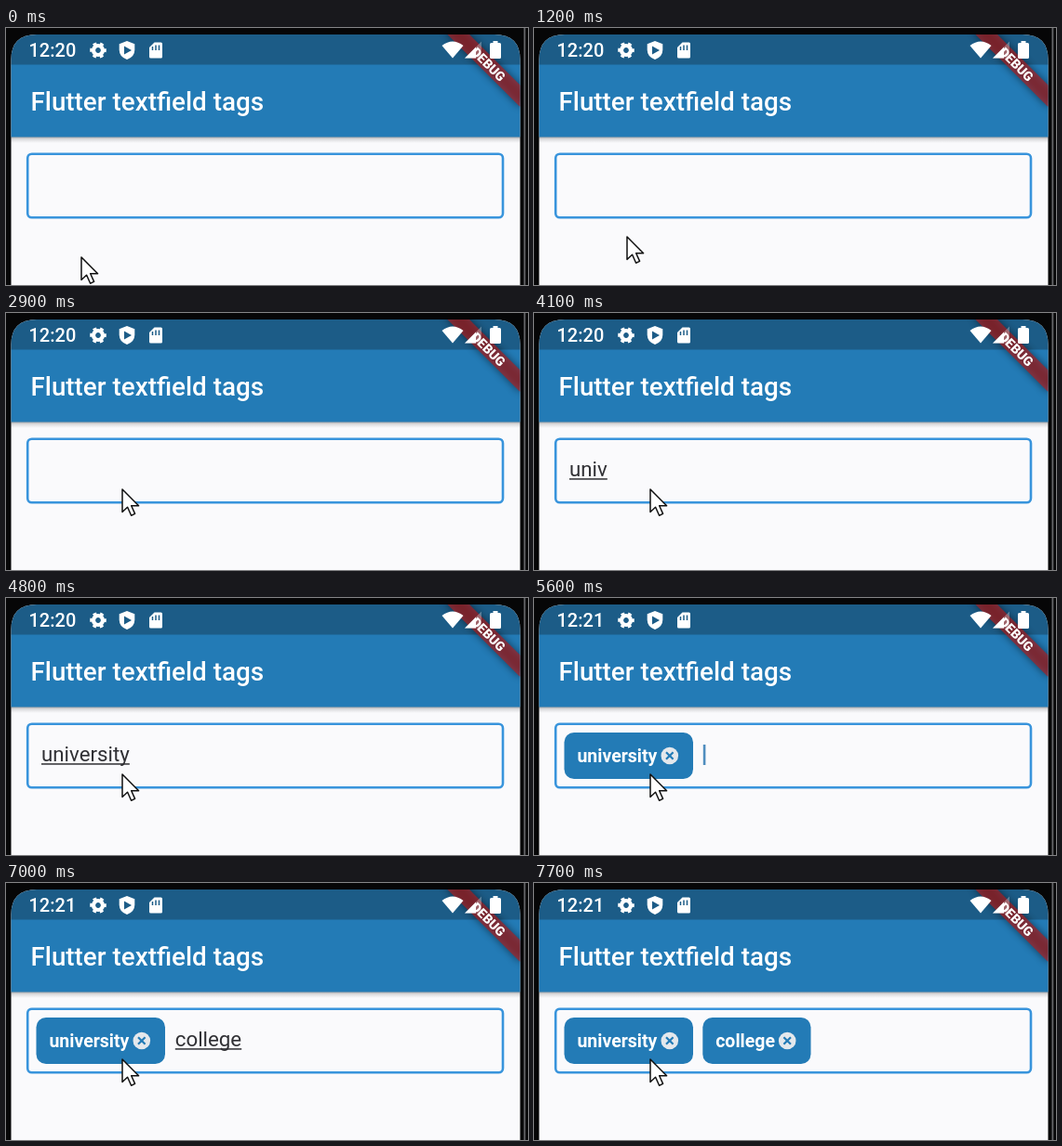
These frames come from a looping animation (561 px wide and 277 px high, 8000 ms). An HTML page:

```html
<!DOCTYPE html>
<html lang="en">
<head>
<meta charset="utf-8">
<title>Flutter textfield tags</title>
<style>
  html, body { margin: 0; width: 100%; height: 100%; overflow: hidden; background: #060607; }
  svg { display: block; width: 561px; height: 277px; font-family: Roboto, "Noto Sans", sans-serif; }
  .chip text { font-size: 19.5px; font-weight: 700; fill: #fff; }
</style>
</head>
<body>
<svg viewBox="0 0 561 277">
  <defs>
    <clipPath id="screen"><path d="M5.500 300V34Q5.500 7 33 7H525Q552.500 7 552.500 34V300Z"/></clipPath>
    <linearGradient id="shade" x2="0" y2="1">
      <stop offset="0" stop-color="#000" stop-opacity=".36"/>
      <stop offset=".4" stop-color="#000" stop-opacity=".12"/>
      <stop offset="1" stop-color="#000" stop-opacity="0"/>
    </linearGradient>
    <filter id="soft" x="-30%" y="-150%" width="160%" height="400%"><feGaussianBlur stdDeviation="4.500"/></filter>
    <g id="cancel">
      <circle r="9.300" fill="#e4e8ec"/>
      <path d="M-3.800-3.800 3.800 3.800M3.800-3.800-3.800 3.800" stroke="#237bb6" stroke-width="2.200"/>
    </g>
  </defs>

  <rect width="561" height="277" fill="#060607"/>
  <rect x="556.500" y="0" width="1.800" height="277" fill="#66676a"/>

  <g clip-path="url(#screen)">
    <rect width="561" height="277" fill="#fafafc"/>
    <rect y="117" width="561" height="7" fill="url(#shade)"/>
    <rect y="39" width="561" height="78.500" fill="#237bb6"/>
    <rect width="561" height="39.500" fill="#1c5c87"/>
    <text x="26.500" y="89.300" font-size="27.800" font-weight="500" fill="#fff">Flutter textfield tags</text>

    <g transform="translate(552 5.800) rotate(45)">
      <rect x="-56" y="39" width="112" height="16.700" fill="#000" opacity=".5" filter="url(#soft)"/>
      <rect x="-56" y="39" width="112" height="16.700" fill="#b71c1c" opacity=".627"/>
      <text y="52.300" font-size="14" font-weight="900" fill="#fff" text-anchor="middle">DEBUG</text>
    </g>
  </g>

  <g fill="#fff">
    <text id="clock" x="24.500" y="31" font-size="20" font-weight="500">12:20</text>
    <g transform="translate(99 24)">
      <circle r="5" fill="none" stroke="#fff" stroke-width="4.200"/>
      <circle r="7.300" fill="none" stroke="#fff" stroke-width="3" stroke-dasharray="3.822" stroke-dashoffset="1.911"/>
    </g>
    <path d="M130 14 138.300 17.200V23.500Q138.300 31 130 34 121.700 31 121.700 23.500V17.200Z"/>
    <path d="M127 19.500 135 24 127 28.500Z" fill="#1c5c87"/>
    <path d="M159.500 15.500H166.500Q168 15.500 168 17V31Q168 32.500 166.500 32.500H155.500Q154 32.500 154 31V21Z"/>
    <path d="M157.500 20v4M161 18.500v5.500M164.500 18.500v5.500" stroke="#1c5c87" stroke-width="1.500"/>
    <path d="M468.500 19Q480 10 491.500 19L480 32.500Z"/>
    <path d="M493 32.500 511 14.500V32.500Z" opacity=".3"/>
    <path d="M493 32.500 505 20.500V32.500Z"/>
    <path d="M523.500 14h5v2h2q1.500 0 1.500 1.500V31.500q0 1.500-1.500 1.500h-9q-1.500 0-1.500-1.500V17.500q0-1.500 1.500-1.500h2Z"/>
  </g>

  <rect x="23.200" y="135.700" width="510.800" height="68.600" rx="4.500" fill="none" stroke="#3894dc" stroke-width="2.600"/>

  <g class="chip" id="chip1">
    <rect x="32.500" y="145" width="138.500" height="50" rx="10.500" fill="#237bb6"/>
    <text x="46.400" y="176.800">university</text>
    <use href="#cancel" x="145.800" y="170"/>
  </g>
  <g class="chip" id="chip2">
    <rect x="181.300" y="145" width="116.200" height="50" rx="10.500" fill="#237bb6"/>
    <text x="195.200" y="176.800">college</text>
    <use href="#cancel" x="272.200" y="170"/>
  </g>

  <text id="typed" y="176.200" font-size="22.300" fill="#303034"></text>
  <rect id="line" y="178.200" height="1.500" fill="#303034"/>
  <rect id="caret" y="158" width="2.600" height="22" fill="#4f8dbe"/>
  <path id="mouse" d="M0 0V24.500L5.600 19.300 9.600 28.200 13.600 26.400 9.700 17.800H17.600Z"
        fill="#fff" stroke="#111" stroke-width="1.500" stroke-linejoin="round"/>
</svg>

<script>
  const LOOP = 8000, STEP = 100;
  const el = id => document.getElementById(id);
  const [clock, chip1, chip2, typed, line, caret, mouse] =
    ['clock', 'chip1', 'chip2', 'typed', 'line', 'caret', 'mouse'].map(el);

  // One entry per phase: left edge, caret start, word and the time of each key.
  const phases = [
    { from: 0, x: 38, blink: 300, word: 'university',
      keys: [3600, 3800, 3900, 4100, 4200, 4400, 4500, 4600, 4700, 4800] },
    { from: 5400, x: 181.8, blink: 5400, word: 'college',
      keys: [5900, 6000, 6200, 6400, 6500, 6900, 7000] },
    { from: 7200, x: 308, blink: 7200, word: '', keys: [] }
  ];

  // Pointer path: time, x, y
  const path = [[900, 81, 247], [1200, 100, 225], [1500, 125, 190]];

  function pointerAt(t) {
    if (t <= path[0][0]) return path[0].slice(1);
    for (let i = 1; i < path.length; i++) {
      const [t0, x0, y0] = path[i - 1], [t1, x1, y1] = path[i];
      if (t <= t1) {
        const k = (t - t0) / (t1 - t0);
        return [x0 + (x1 - x0) * k, y0 + (y1 - y0) * k];
      }
    }
    return path[path.length - 1].slice(1);
  }

  const show = (node, on) => node.setAttribute('visibility', on ? 'visible' : 'hidden');

  function draw(t) {
    const phase = phases.filter(p => t >= p.from).pop();
    const text = phase.word.slice(0, phase.keys.filter(k => t >= k).length);
    typed.textContent = text;
    typed.setAttribute('x', phase.x);
    const width = text ? typed.getComputedTextLength() : 0;
    line.setAttribute('x', phase.x);
    line.setAttribute('width', width);
    caret.setAttribute('x', phase.x + width);
    show(caret, t >= phase.blink && (t - phase.blink) % 1000 < 500);
    show(chip1, t >= phases[1].from);
    show(chip2, t >= phases[2].from);
    clock.textContent = t < 5100 ? '12:20' : '12:21';
    mouse.setAttribute('transform', `translate(${pointerAt(t)})`);
  }

  const start = performance.now();
  let last = -1;
  function tick() {
    const t = Math.floor((performance.now() - start) % LOOP / STEP) * STEP;
    if (t !== last) draw(last = t);
    requestAnimationFrame(tick);
  }
  tick();
</script>
</body>
</html>
```
